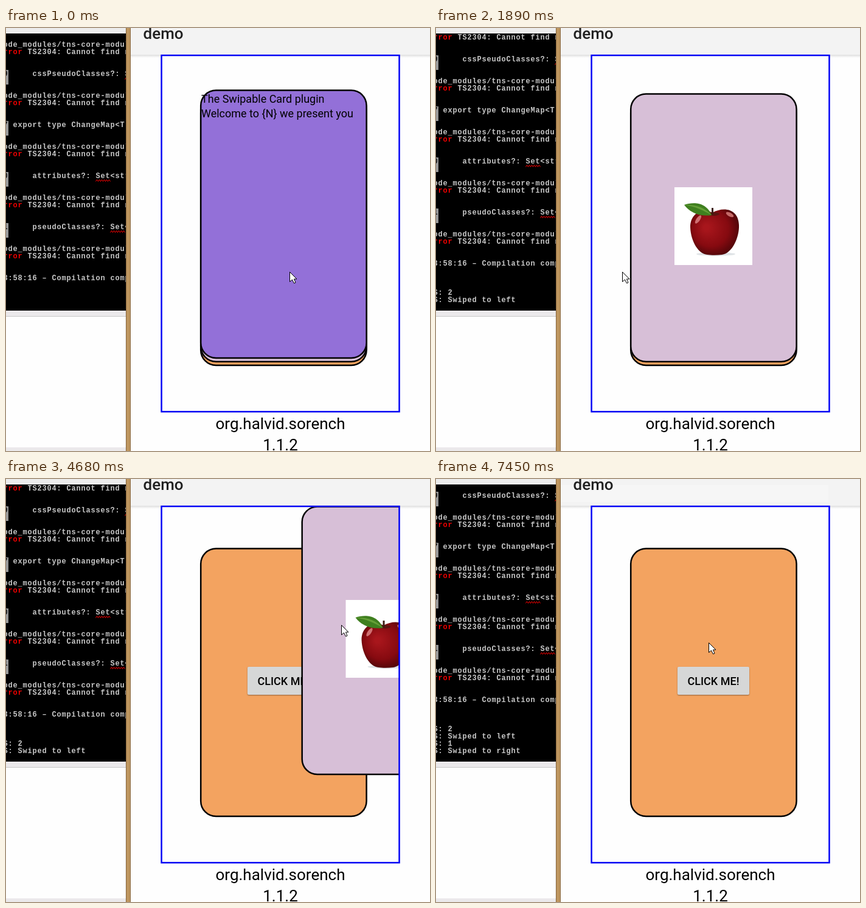
Write an HTML page with a canvas that moves like this. It is 697 px wide and 696 px high and loops after 8000 ms.

```html
<!DOCTYPE html>
<html lang="en">
<head>
<meta charset="utf-8">
<title>Swipable card demo</title>
<style>
html, body { margin: 0; width: 100%; height: 100%; overflow: hidden; background: #fff; }
canvas { display: block; }
</style>
</head>
<body>
<canvas id="stage" width="697" height="696"></canvas>
<script>
const ctx = document.getElementById('stage').getContext('2d');
const LOOP = 8000;
const TICK = 135;
const SANS = 'Roboto, sans-serif';
const MONO = '"Liberation Mono", monospace';
const LEFT_DONE = 1890, RIGHT_DONE = 5220;

const move = (from, to, x, y) => ({ from, to, x, y });

const pointer = [
  move(0, 0, 466, 402),
  move(130, 530, 563, 432),
  move(1080, 1200, 437, 428),
  move(1320, 1620, 290, 399),
  move(1770, 1890, 306, 402),
  move(2450, 2570, 379, 303),
  move(2720, 2850, 347, 314),
  move(3590, 3590, 420, 268),
  move(3710, 3990, 505, 239),
  move(4140, 4680, 551, 241),
  move(4800, 5220, 580, 246),
  move(5850, 5850, 485, 318),
  move(6120, 6390, 464, 332),
  move(7330, 7450, 448, 270)
];
const leftSwipe = [
  move(1080, 1200, -62.5, 1),
  move(1320, 1770, -258, -30)
];
const rightSwipe = [
  move(3590, 3590, 18, -12),
  move(3710, 3990, 104, -78),
  move(4140, 4680, 166.5, -63),
  move(4800, 5070, 210, -58)
];

function along(moves, t) {
  let x = 0, y = 0;
  for (const m of moves) {
    if (t < m.from) break;
    const steps = Math.round((m.to - m.from) / TICK) + 1;
    const pace = (m.to - m.from) / (steps - 1 || 1) || 1;
    const p = Math.min(1, (Math.floor((t - m.from) / pace + 0.001) + 1) / steps);
    const ease = 1 - (1 - p) ** 1.5;
    x += (m.x - x) * ease;
    y += (m.y - y) * ease;
  }
  return [x, y];
}

function rect(x, y, w, h, color) {
  ctx.fillStyle = color;
  ctx.fillRect(x, y, w, h);
}

function text(str, x, y, font, color = '#000', align = 'left') {
  ctx.font = font;
  ctx.fillStyle = color;
  ctx.textAlign = align;
  ctx.fillText(str, x, y);
}

function shape(path, fill, stroke) {
  const p = new Path2D(path);
  if (fill) { ctx.fillStyle = fill; ctx.fill(p); }
  if (stroke) { ctx.strokeStyle = stroke; ctx.lineWidth = 1; ctx.stroke(p); }
}

function ellipse(x, y, rx, ry, turn, color) {
  ctx.beginPath();
  ctx.ellipse(x, y, rx, ry, turn, 0, 2 * Math.PI);
  ctx.fillStyle = color;
  ctx.fill();
}

function clipped(x, y, w, h, draw) {
  ctx.save();
  ctx.beginPath();
  ctx.rect(x, y, w, h);
  ctx.clip();
  draw();
  ctx.restore();
}

// --- Console: 8 by 12 pixel character cells ---

const snippets = [
  '    cssPseudoClasses?: Set<string>',
  'export type ChangeMap<T',
  '    attributes?: Set<string>',
  '    pseudoClasses?: Set<string>'
];
const log = ['JS: 2', 'JS: Swiped to left', 'JS: 1', 'JS: Swiped to right'];
const column = n => -12.5 + 8 * n;

function line(str, n, y, color = '#c8c8c8') {
  text(str, column(n), y + 4, 'bold 12px ' + MONO, color);
}

function squiggle(x, y) {
  shape(`M${x} ${y}` + 'l2-3l2 3'.repeat(6), null, '#f00');
}

function drawConsole(t) {
  const printed = t >= 5070 ? 4 : t >= 1770 ? 2 : 0;
  const top = 27 - 12 * printed;
  rect(0, 0, 197, 9, '#ececec');
  rect(0, 9, 197, 456, '#000');
  clipped(0, 10, 197, 455, () => {
    ctx.letterSpacing = '0.8px';
    for (let i = 0; i <= snippets.length; i++) {
      const y = top + 84 * i;
      line('node_modules/tns-core-modules', 0, y);
      line('error', 0, y + 12, '#f00000');
      line('TS2304: Cannot find name', 6, y + 12);
      if (i === snippets.length) break;
      rect(0, y + 42, 4, 24, '#999');
      line('9701'[i], 1, y + 48, '#111');
      line(snippets[i], 3, y + 48);
      const mark = snippets[i].indexOf('Set');
      if (mark > 0) squiggle(column(3 + mark), y + 57.5);
    }
    line('13:58:16 – Compilation complete', 0, top + 384);
    log.slice(0, printed).forEach((s, i) => line(s, 0, top + 432 + 12 * i));
    ctx.letterSpacing = '0px';
  });
  rect(0, 465, 197, 9, '#ebe9eb');
  rect(0, 474, 197, 1, '#c8c8c8');
  rect(0, 690, 197, 6, '#ebe9eb');
  rect(197, 0, 8, 696, '#866640');
  rect(198, 0, 6, 696, '#be965f');
}

// --- App ---

function card(dx, dy, color) {
  ctx.beginPath();
  ctx.roundRect(320.2 + dx, 102.6 + dy, 272.4, 440.3, 25);
  ctx.fillStyle = color;
  ctx.fill();
  ctx.lineWidth = 2.5;
  ctx.strokeStyle = '#000';
  ctx.stroke();
}

function welcomeCard([dx, dy]) {
  card(dx, dy, '#9370d8');
  ['The Swipable Card plugin', 'Welcome to {N} we present you'].forEach((s, i) =>
    text(s, 321 + dx, 123 + 24 * i + dy, '18px ' + SANS));
}

function apple(x, y) {
  ctx.save();
  ctx.translate(x, y);
  rect(0, 0, 128, 128, '#fff');
  ellipse(68, 110, 32, 3, 0, '#dfe3e6');
  const skin = ctx.createRadialGradient(52, 66, 4, 64, 70, 46);
  skin.addColorStop(0, '#a8161c');
  skin.addColorStop(0.6, '#860a10');
  skin.addColorStop(1, '#4a0508');
  shape('M62 42C48 34 26 41 26 66C27 90 40 110 54 111C60 112 70 112 78 111C95 109 107 82 106 62C105 36 82 31 62 42Z', skin);
  ellipse(64, 44, 10, 3, 0, '#5a1410');
  ellipse(39, 53, 3, 8, 0.6, '#cf7072');
  ellipse(91, 45, 7, 3, 0.5, '#c56a68');
  rect(61, 34, 3, 11, '#3d1c12');
  shape('M61 46C52 24 31 24 16 29C24 40 39 49 61 46Z', '#3f7f1f');
  shape('M61 46C50 33 34 28 16 29C35 32 48 38 61 46Z', '#65a038');
  ctx.restore();
}

function appleCard([dx, dy]) {
  card(dx, dy + 6, '#d7bfd7');
  apple(392 + dx, 262 + dy);
}

function buttonCard(t) {
  card(0, 12, '#f3a360');
  const pressed = t >= 6790 && t < 7060;
  ctx.save();
  ctx.shadowColor = 'rgba(0,0,0,.4)';
  ctx.shadowBlur = pressed ? 4 : 2;
  ctx.shadowOffsetY = pressed ? 3 : 1;
  ctx.beginPath();
  ctx.roundRect(397, 309, 118, 46, 2);
  ctx.fillStyle = '#d6d7d7';
  ctx.fill();
  ctx.restore();
  text('CLICK ME!', 456, 339, '500 18px ' + SANS, '#000', 'center');
}

function drawApp(t) {
  rect(205, 0, 492, 44, '#f3f3f3');
  const shade = ctx.createLinearGradient(0, 43, 0, 49);
  shade.addColorStop(0, '#d8d8d8');
  shade.addColorStop(1, '#fefefe');
  rect(205, 44, 492, 5, shade);
  if (t >= 5070) rect(205, 10, 440, 28, '#f6f6f6');
  text('demo', 225.5, 18, '500 26px ' + SANS, '#212121');

  rect(255, 44, 392, 588, '#fefefe');
  clipped(257, 46, 389, 585, () => {
    buttonCard(t);
    if (t < RIGHT_DONE) appleCard(along(rightSwipe, t));
    if (t < LEFT_DONE) welcomeCard(along(leftSwipe, t));
  });
  ctx.lineWidth = 2.5;
  ctx.strokeStyle = '#0000f5';
  ctx.strokeRect(255.6, 45, 390.9, 586.3);

  text('org.halvid.sorench', 451, 660, '26px ' + SANS, '#000', 'center');
  text('1.1.2', 451, 695, '26px ' + SANS, '#000', 'center');
}

function drawPointer([x, y]) {
  ctx.save();
  ctx.translate(Math.round(x) + 0.5, Math.round(y) - 0.5);
  shape('M0 0V16L4 12.5L7 18.5L9.5 17.5L7 11.5H11.5Z', '#fff', '#000');
  ctx.restore();
}

function frame(now) {
  const t = now % LOOP;
  rect(0, 0, 697, 696, '#fefefe');
  drawConsole(t);
  drawApp(t);
  drawPointer(along(pointer, t));
  requestAnimationFrame(frame);
}

frame(0);
</script>
</body>
</html>
```
